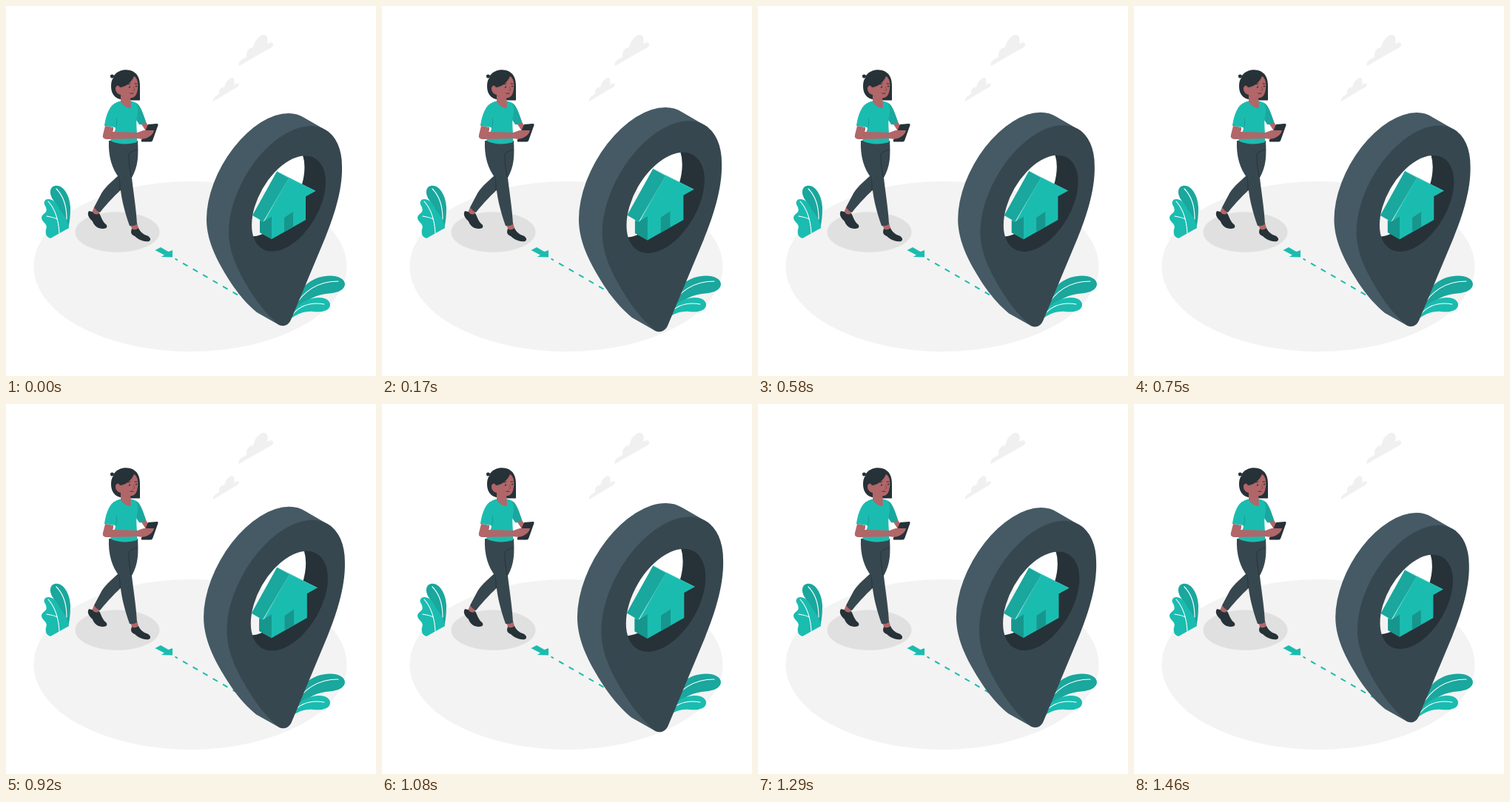
Write an HTML page that moves like this. It is 500 px wide and 500 px high and loops after 1.5 s.

```html
<!DOCTYPE html>
<html lang="en">
<head>
<meta charset="utf-8">
<title>Walking to the pin</title>
<style>
  html, body { margin: 0; width: 100%; height: 100%; overflow: hidden; background: #fff; }
  svg { display: block; width: 100%; height: 100%; }
  .teal { fill: #1bbcb0; }
  .teal-mid { fill: #1aa79d; }
  .teal-dark { fill: #16968d; }
  .slate { fill: #37474f; }
  .ink { fill: #263238; }
  .skin { fill: #b16668; }
  .cloud { fill: #f0f0f0; }
  .vein { fill: none; stroke: #fff; stroke-width: 1.1; stroke-linecap: round; }
  .crease { fill: none; stroke: #263238; stroke-width: .9; stroke-linecap: round; }
</style>
</head>
<body>
<svg viewBox="0 0 500 500">
  <defs>
    <ellipse id="rim" rx="40.700" ry="70.700" transform="translate(382 267) rotate(30)"/>
    <clipPath id="hole"><use href="#rim"/></clipPath>
    <mask id="see-through" maskUnits="userSpaceOnUse" x="250" y="120" width="230" height="340">
      <path fill="#fff" d="M250 120H480V460H250Z"/>
      <g clip-path="url(#hole)"><use href="#rim" transform="translate(-28.500 -20)"/></g>
    </mask>
  </defs>

  <ellipse cx="249" cy="352" rx="211.500" ry="115" fill="#f3f3f3"/>
  <ellipse cx="150.500" cy="305.500" rx="57" ry="27.300" fill="#e0e0e0"/>

  <g class="cloud">
    <path d="M315 81C313 77 316 73 325 69C324 61 329 55 334 56C336 46 343 38 350 39C354 41 354 46 353 51C358 48 362 49 361 53C360 56 357 57 353 59Z"/>
    <path d="M280 129C279 126 281 123 288 119C287 113 291 109 295 110C297 102 302 97 306 97C309 99 309 103 308 107C312 104 315 104 315 106C314 109 311 111 308 112Z"/>
  </g>

  <g id="left-plant">
    <path class="teal-mid" d="M72 300C73 286 70 274 65 264C58 255 58 245 66 243C77 241 86 255 87 272C87 284 86 292 84 301Z"/>
    <path class="teal" d="M60 314C54 312 53 307 54 302C56 298 54 295 51 292C47 288 47 284 51 281C56 278 55 274 53 270C50 266 52 261 57 261C64 261 68 266 71 272C74 279 79 282 81 288C83 292 84 296 85 300Z"/>
    <path class="vein" d="M68 247C77 256 82 271 82 288M57 264C66 274 71 288 72 307M55 284C61 285 66 286 69 288"/>
  </g>

  <g id="right-plant">
    <path class="teal-mid" d="M384 415C390 392 402 374 422 367C440 361 458 366 458 376C457 386 444 388 432 389C414 391 401 402 389 414Z"/>
    <path class="teal" d="M384 423C388 409 400 398 415 395C429 392 439 397 438 405C436 413 425 414 415 413C403 412 394 416 384 423Z"/>
    <path class="vein" d="M388 409C401 386 421 372 449 372M387 417C398 404 413 400 430 403"/>
  </g>

  <path class="teal" d="M201.500 330L209 326L219.500 332L225 330V339.500L209.500 339L214 336.500Z"/>
  <path d="M228.500 341.500L340 406" fill="none" stroke="#1bbcb0" stroke-width="2" stroke-dasharray="7.400 8.200" stroke-dashoffset="3.400"/>

  <g id="woman">
    <path class="ink" d="M112 277C109 282 112 286 117 291C119 297 124 301 131 301C136 301 138 298 135 295C130 291 129 285 126 280Z"/>
    <path class="ink" d="M170 301C168 306 169 309 174 311C179 316 187 319 193 318C197 316 195 312 190 310C184 308 181 304 179 300Z"/>
    <path class="skin" d="M119 272L116.500 278Q120 283 125 281L127 277ZM168 294L170 301Q174 304 179 300L177 293Z"/>
    <path class="slate" d="M152 229C142 238 132 246 127 257L119 272Q122 277 127 279C138 265 150 253 158 246Z"/>
    <path class="slate" d="M139 182C138 203 143 220 154 234C154 255 160 277 167 297Q172 298 177 295C176 273 172 251 170 232C179 216 179 201 178 182Z"/>
    <path class="crease" d="M177 194C173 196 169 197 166 200C166 211 167 221 169 231M153 231C154 238 154 243 154 249"/>

    <path class="skin" d="M180 155L186 152L193 163L189 169Z"/>
    <path class="teal-mid" d="M172 130C180 130 183 139 189 156C187 159 183 161 180 160L172 148Z"/>
    <path class="teal" d="M150 130C157 127 169 128 174 130C179 134 179 142 177 150C175 160 178 172 177 184C165 188 150 187 141 182C144 174 148 169 148 164L133 162C135 149 139 134 150 130Z"/>
    <path d="M148 165C150 161 150 155 149 151" fill="none" stroke="#16968d" stroke-width=".8"/>
    <path class="ink" d="M192 160L204 159Q206 159 205.500 161L198 182Q197 183.500 195 183.500H184Q182 183 183 181Z"/>
    <path class="skin" d="M134 162L145 164C145 167 145 169 144 170L178 171C183 169 187 167 191 168L200 168C199 173 195 176 191 178C187 180 183 180 178 179L138 180C132 180 130 178 131 174Z"/>

    <path class="ink" d="M146 96C143 99 141 97 141 95C141 92 144 92 146 94C151 87 160 85 168 87C178 90 181 98 181 108V127.500H166L154 126C144 123 142 115 142 108C142 103 143 99 146 96Z"/>
    <path class="skin" d="M155 117V130Q161 138 169 138L168 120Z"/>
    <path class="skin" d="M154 110C162 109 169 104 173 95C178 97 179 106 178 112C177 120 174 125 167 124C162 124 158 122 155 120C150 119 148 115 148 112C148 107 152 106 154 110Z"/>
    <path class="crease" d="M165 106L168 105M174 105L177 105M168 118L172 118"/>
    <path d="M172.500 109L174 114L171 114" fill="none" stroke="#8c484c" stroke-width=".8"/>
    <circle class="ink" cx="167" cy="109.500" r="1.100"/>
    <circle class="ink" cx="176" cy="108.500" r="1"/>
  </g>

  <g id="pin">
    <g mask="url(#see-through)">
      <path fill="#455a64" d="M271 288A62.300 108.200 30 0 1 382 145C390 145 397 147 403 151L436 170L374 432L369 431L339 414C328 405 318 394 308 380C288 350 271 320 271 288Z"/>
      <path class="slate" d="M301 305.400A62.300 108.200 30 0 1 454 216.600C455 250 442 287 431 314L385 424C382 431 376 434 369 431C358 422 348 411 338 397C318 367 301 337 301 305.400Z"/>
      <use href="#rim" class="ink"/>
    </g>
    <path class="teal" d="M366 223.500L418.500 250L405 257.500V289L359 315L343 306V289L349 291L382 232Z"/>
    <path class="teal-mid" d="M366 223.500L382.500 232.500L347.500 291.500L333 283Z"/>
    <path class="teal-dark" d="M343 290L347.500 291.500L359 284.500V315L343 306ZM376 286L388 278V298.500L376 305Z"/>
    <path d="M366 223.500L382.500 232.500L418 250M382.500 232.500L347.500 291.500" fill="none" stroke="#49cac0" stroke-width=".6"/>
  </g>
</svg>
<script>
  const LOOP = 1500, DRAWN_SCALE = 1.015;
  const beats = [[0, 1.015], [170, 1.071], [265, 1.1], [380, 1.079], [670, 1],
                 [750, 1.021], [1110, 1.1], [1290, 1.05], [1460, 1.001], [LOOP, 1.015]];
  const pin = document.getElementById('pin');

  function scaleAt(time) {
    const next = beats.findIndex(([t]) => t > time);
    const [t0, s0] = beats[next - 1], [t1, s1] = beats[next];
    return s0 + (s1 - s0) * (time - t0) / (t1 - t0);
  }

  function draw() {
    const scale = scaleAt(performance.now() % LOOP) / DRAWN_SCALE;
    pin.setAttribute('transform', `translate(362.5 288.5) scale(${scale}) translate(-362.5 -288.5)`);
    requestAnimationFrame(draw);
  }
  draw();
</script>
</body>
</html>
```
